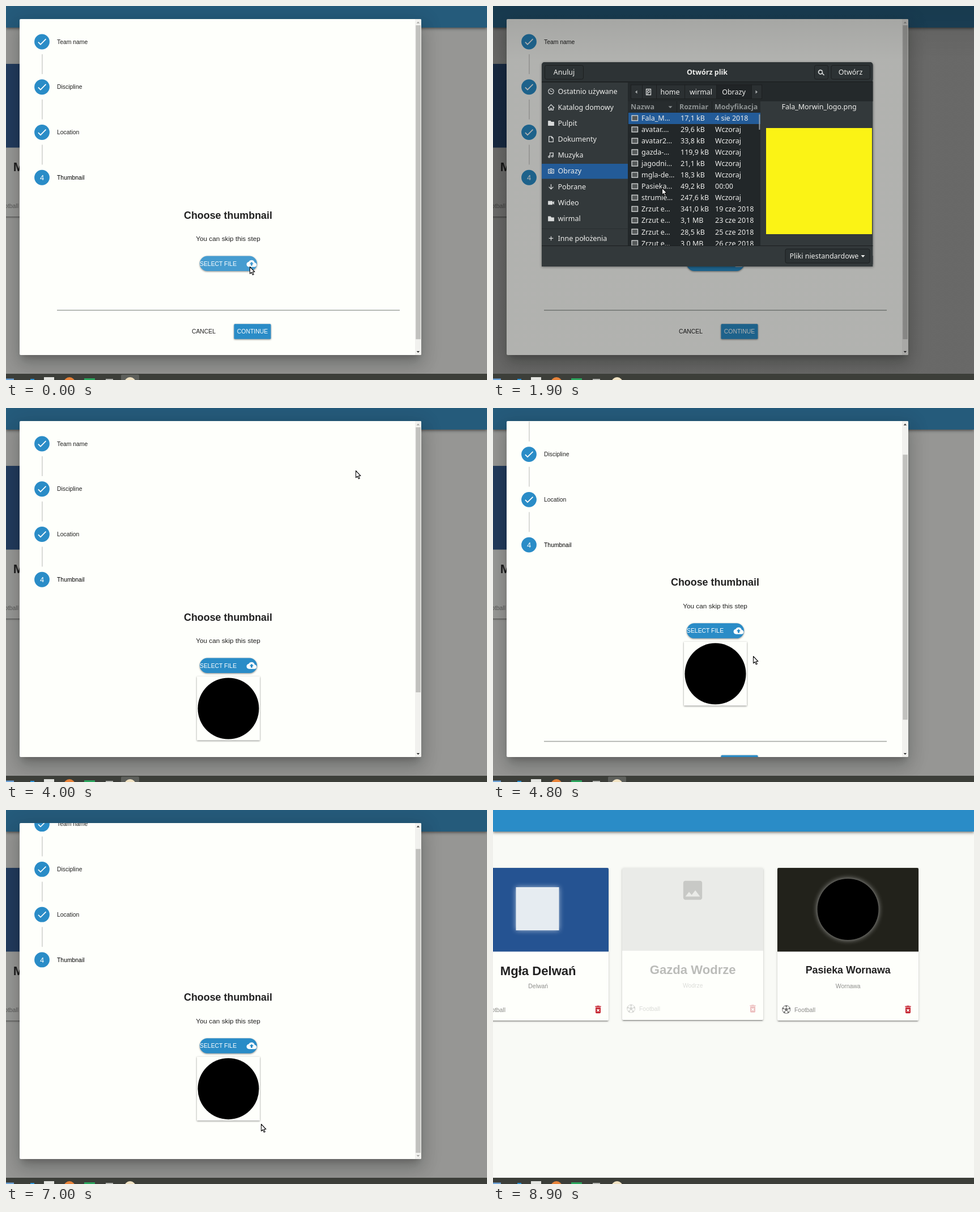
Write an HTML page that moves like this. It is 849 by 659 pixels and loops after 9.6 s.

```html
<!DOCTYPE html>
<html lang="en">
<head>
<meta charset="utf-8">
<title>Team wizard</title>
<style>
  html, body { margin: 0; width: 100%; height: 100%; overflow: hidden; background: #f9faf6; }
  #stage { position: relative; width: 849px; height: 659px; overflow: hidden; }
  #stage div { position: absolute; }
  svg { position: absolute; left: 0; top: 0; display: block; overflow: hidden; }
  text { font-family: "Liberation Sans", Arial, sans-serif; }
  .mid { text-anchor: middle; }
  .bold { font-weight: 700; }
  .card { background: #fefffb; border-radius: 2px; overflow: hidden;
    box-shadow: 0 3px 1px -2px #0003, 0 2px 2px #0003, 0 1px 5px #0002; }
  .raised { filter: drop-shadow(0 1px 1.5px #0007); }
  #bar { left: 0; top: 0; width: 849px; height: 37.5px; background: #2a8cc7;
    box-shadow: 0 2px 3px -1px #0004, 0 3px 4px #0003, 0 1px 8px #0003; }
  #overlay { inset: 0; background: #212121; }
  #modal { background: #fefffb; overflow: hidden; border-radius: 2px;
    box-shadow: 0 8px 11px -5px #0003, 0 18px 28px 2px #00000024, 0 7px 34px 6px #0000001f; }
  #dim { inset: 0 0 11px; background: linear-gradient(#0000005c, #0000004d 15%); }
  #chooser { border-radius: 5px 5px 0 0; box-shadow: 0 1px 4px #0006; }
  #chooser text { font-family: "Noto Sans", sans-serif; font-size: 12.5px; fill: #eeeeec; }
  #chooser .head { fill: #8d9293; }
  .icon { fill: none; stroke: #d8dada; stroke-width: 1.3; }
</style>
</head>
<body>
<div id="stage"></div>
<script>
const LOOP = 9600, STEP = 100, BLUE = '#2a8cc7', HOVER = '#469cd0', SELECTED = '#235b98';
const stage = document.getElementById('stage');

const text = (x, y, size, str, cls = '', fill = '#212121', extra = '') =>
  `<text x="${x}" y="${y}" font-size="${size}" class="${cls}" fill="${fill}" ${extra}>${str}</text>`;
const rect = (x, y, w, h, fill, extra = '') =>
  `<rect x="${x}" y="${y}" width="${w}" height="${h}" fill="${fill}" ${extra}/>`;
const circle = (x, y, r, fill, extra = '') =>
  `<circle cx="${x}" cy="${y}" r="${r}" fill="${fill}" ${extra}/>`;
const path = (d, fill, extra = '') => `<path d="${d}" fill="${fill}" ${extra}/>`;
const icon = (d, x, y, scale, fill) =>
  path(d, fill, `transform="translate(${x} ${y}) scale(${scale}) translate(-12 -12)"`);
const svg = (x, y, w, h, body, id = '') =>
  `<svg ${id && `id="${id}"`} width="${w}" height="${h}" viewBox="${x} ${y} ${w} ${h}">${body}</svg>`;
const panel = (id, cls, x, y, w, h, body) =>
  `<div id="${id}" class="${cls}" style="left:${x}px;top:${y}px;width:${w}px;height:${h}px">${body}</div>`;

const ICONS = {
  check: 'M9 16.17 4.83 12l-1.42 1.41L9 19 21 7l-1.41-1.41z',
  cloud: 'M19.35 10.04C18.67 6.59 15.64 4 12 4 9.11 4 6.6 5.64 5.35 8.04 2.34 8.36 0 10.91 0 14c0 3.31 2.69 6 6 6h13c2.76 0 5-2.24 5-5 0-2.64-2.05-4.78-4.65-4.96zM14 13v4h-4v-4H7l5-5 5 5z',
  trash: 'M6 19c0 1.1.9 2 2 2h8c1.1 0 2-.9 2-2V7H6zm2.46-7.12 1.41-1.41L12 12.59l2.12-2.12 1.41 1.41L13.41 14l2.12 2.12-1.41 1.41L12 15.41l-2.12 2.12-1.41-1.41L10.59 14zM15.5 4l-1-1h-5l-1 1H5v2h14V4z',
  image: 'M21 19V5c0-1.1-.9-2-2-2H5c-1.1 0-2 .9-2 2v14c0 1.1.9 2 2 2h14c1.1 0 2-.9 2-2zM8.5 13.5l2.5 3.01L14.5 12l4.5 6H5z'
};

// Team cards
function ball(x, y) {
  const at = (i, r) => {
    const a = (i * 72 - 90) * Math.PI / 180;
    return [x + r * Math.cos(a), y + r * Math.sin(a)].map(v => v.toFixed(1));
  };
  const five = [0, 1, 2, 3, 4];
  return circle(x, y, 7, 'none', 'stroke="#757575"') +
    path('M' + five.map(i => at(i, 3)).join('L') + 'z', '#757575') +
    path(five.map(i => `M${at(i, 3)}L${at(i, 7)}`).join(''), 'none', 'stroke="#757575"') +
    five.map(i => circle(...at(i, 6), 1.6, '#757575')).join('');
}

function card(id, x, height, picture, logo, name, size, baseline, place, opacity = 1) {
  const bottom = 102 + height, mid = x + 124.7;
  const body = rect(x, 102, 250, height - 121.5, picture) + logo +
    text(mid, baseline, size, name, 'mid bold') +
    text(mid, bottom - 57, 10.4, place, 'mid', '#8e8e8c') +
    ball(x + 15.7, bottom - 19.5) +
    text(x + 30, bottom - 15.5, 10.4, 'Football', '', '#8a8a88') +
    icon(ICONS.trash, x + 230.5, bottom - 19.5, .745, '#c62834');
  return panel(id, 'card', x, 102, 249, height, svg(x, 102, 249, height, `<g opacity="${opacity}">${body}</g>`));
}

const glow = 'style="filter:drop-shadow(0 0 5px #fff9)"';
const cards =
  card('card1', -45.5, 269, '#255392', rect(40, 136, 76, 76, '#e6ecf1', glow), 'Mgła Delwań', 22.1, 291, 'Delwań') +
  card('card2', 228, 267.5, '#bdbdbb', icon(ICONS.image, 352.5, 141.5, 1.85, '#4b4b4b'), 'Gazda Wodrze', 22.1, 289, 'Wodrze', .3) +
  card('card3', 501.5, 269, '#22221b', circle(626, 175, 54, '#000', glow), 'Pasieka Wornawa', 17.8, 287.5, 'Wornawa');

// Wizard
const stepY = i => 63 + i * 79.75;
const steps = ['Team name', 'Discipline', 'Location', 'Thumbnail'].map((label, i) =>
  circle(63.5, stepY(i), 13.4, BLUE, 'class="dot"') +
  (i < 3
    ? icon(ICONS.check, 63.5, stepY(i), .84, '#fff') + rect(63.3, stepY(i) + 22, 1.3, 35, '#c6c7c4')
    : text(63.5, stepY(i) + 4.6, 13, '4', 'mid', '#fff')) +
  text(90, stepY(i) + 3.7, 10.4, label, '', i < 3 ? '#212121' : '#000')).join('');

const wizard = steps +
  text(392, 374.5, 17.9, 'Choose thumbnail', 'mid bold') +
  text(392, 414.3, 11.8, 'You can skip this step', 'mid') +
  `<g class="raised">${rect(342, 440.5, 101, 26.5, BLUE, 'rx="13.25" id="select"')}</g>` +
  text(342, 457.5, 10.4, 'SELECT FILE', '', '#fff') +
  icon(ICONS.cloud, 433.5, 453.7, .745, '#fff') +
  `<g id="thumb">${rect(337, 473, 111, 112.5, '#fefffb', 'class="raised"')}${circle(392.5, 529.5, 54, '#000')}</g>
  <g id="footer">${rect(90, 535.3, 605, 1.6, '#a6aaa5')}
  ${text(349, 577.2, 10.4, 'CANCEL', 'mid')}
  ${rect(402.5, 560.3, 65, 26.5, BLUE, 'rx="1.5" class="raised" id="continue"')}
  ${text(435, 577.2, 10.4, 'CONTINUE', 'mid', '#fff')}</g>`;

const scrollbar = rect(722, 23, 11, 592, '#f1f1ee') +
  rect(723.3, 34, 8.5, 553, '#c1c1be', 'id="grip"') +
  path('M724.7 30.5h5.4l-2.7-3z', '#505050', 'id="up"') +
  path('M724.7 608h5.4l-2.7 3z', '#505050', 'id="down"');

const modal = panel('modal', '', 24, 23, 709, 592,
  svg(24, 23, 709, 760, `<clipPath id="clip">${rect(24, 23, 709, 700, '#000', 'id="clipBox"')}</clipPath>
    <g clip-path="url(#clip)">${wizard}</g>`, 'content') +
  svg(24, 23, 709, 592, scrollbar, 'scroll'));

// File chooser
const FOLDER = 'M-5-4h4l1 2h5v6H-5z';
const places = [
  ['Ostatnio używane', 'M0-5A5 5 0 1 1-.1-5zM-2-2 0 0h2.5'],
  ['Katalog domowy', 'M-6 1 0-5 6 1M-4 0v5h3V2h2v3h3V0'],
  ['Pulpit', FOLDER],
  ['Dokumenty', 'M-4-5h5l3 3v7h-8zM1-5v3h3'],
  ['Muzyka', 'M-2 3v-7h6v6M-2 3a1.5 1.5 0 1 1-.1-.5M4 2a1.5 1.5 0 1 1-.1-.5'],
  ['Obrazy', 'M-5-3h3l1-1h2l1 1h3v7H-5zM0-1.5A2 2 0 1 1-.1-1.5'],
  ['Pobrane', 'M0-5V4M-4 0 0 4 4 0'],
  ['Wideo', 'M-5-3h7v6h-7zM3 0l2-2v4z'],
  ['wirmal', FOLDER],
  ['Inne położenia', 'M-4 0h8M0-4v8']
].map(([label, d], i) => {
  const y = 150.5 + i * 28.05 + (i > 8 ? 6.5 : 0);
  const solid = [2, 7, 8].includes(i) ? 'style="fill:#d8dada"' : '';
  return path(d, 'none', `class="icon" ${solid} transform="translate(102.5 ${y}) scale(.95)"`) +
    text(114.5, y + 4.5, 12.5, label);
}).join('');

const rowY = i => 188 + i * 20.02;
const files = [
  ['Fala_M…', '17,1 kB', '4 sie 2018'], ['avatar.…', '29,6 kB', 'Wczoraj'],
  ['avatar2…', '33,8 kB', 'Wczoraj'], ['gazda-…', '119,9 kB', 'Wczoraj'],
  ['jagodni…', '21,1 kB', 'Wczoraj'], ['mgla-de…', '18,3 kB', 'Wczoraj'],
  ['Pasieka…', '49,2 kB', '00:00'], ['strumie…', '247,6 kB', 'Wczoraj'],
  ['Zrzut e…', '341,0 kB', '19 cze 2018'], ['Zrzut e…', '3,1 MB', '23 cze 2018'],
  ['Zrzut e…', '28,5 kB', '25 cze 2018'], ['Zrzut e…', '3,0 MB', '26 cze 2018']
].map(([name, size, date], i) => {
  const y = rowY(i);
  return rect(245, y + 5, 10.5, 9, '#55595a', 'stroke="#d8dada" stroke-width="1.3"') +
    text(262, y + 14.3, 12.5, name) + text(331, y + 14.3, 12.5, size) + text(392, y + 14.3, 12.5, date);
}).join('');

const button = (x, y, w, h) => rect(x, y, w, h, '#2c3234', 'rx="3" stroke="#1c1f20"');
const chooser = panel('chooser', '', 86, 99, 584.5, 360, svg(86, 99, 584.5, 360,
  rect(86, 99, 584.5, 360, '#33393b', 'rx="5"') + rect(86, 440, 584.5, 19, '#33393b') +
  rect(86, 99, 584.5, 35, '#2d3335', 'rx="5"') + rect(86, 133, 584.5, 1.5, '#191c1d') +
  button(91.5, 104.5, 68, 24.5) + button(567.5, 104.5, 24, 24.5) + button(597, 104.5, 68.5, 24.5) +
  text(125.5, 121, 12.5, 'Anuluj', 'mid') + text(378, 121, 12.5, 'Otwórz plik', 'mid bold') +
  text(631, 121, 12.5, 'Otwórz', 'mid') +
  path('M581.5 116a3.5 3.5 0 1 1-.1-.5M581 118.5l3.5 3.5', 'none', 'class="icon" style="stroke-width:1.7"') +
  rect(86, 278, 152, 26.5, SELECTED) + places + rect(86, 392, 152, 1, '#2a2f31') +
  rect(238, 134.5, 432.5, 33.5, '#24292b') +
  [[243, 20], [263, 25], [288, 50], [338, 56], [394, 62], [456, 18]].map(([x, w]) =>
    rect(x + .5, 139, w, 24.5, x === 394 ? '#202426' : '#2b3032', 'stroke="#1c1f20"')).join('') +
  path('M254.5 148.5v6l-3.5-3zM463.5 148.5v6l3.5-3z', '#a9adad') +
  path('M270.5 146.5h8v10h-8zM276.5 150.5a2 2 0 1 1-.1-.5M272 154.5h2', 'none', 'class="icon"') +
  text(312.5, 156, 12.5, 'home', 'mid') + text(367, 156, 12.5, 'wirmal', 'mid') + text(425, 156, 12.5, 'Obrazy', 'mid') +
  rect(238, 168, 234, 254, '#222729') + rect(238, 168, 234, 19.5, '#272c2e') +
  rect(324, 168, 1, 19, '#1d2122') + rect(386, 168, 1, 19, '#1d2122') +
  text(243, 182.3, 12.5, 'Nazwa', 'bold head') + text(329, 182.3, 12.5, 'Rozmiar', 'bold head') +
  text(391, 182.3, 12.5, 'Modyfikacja', 'bold head') + path('M309.5 176.5h7l-3.5 3.5z', '#8d9293') +
  `<clipPath id="listClip">${rect(238, 188, 234, 234, '#000')}</clipPath>
  <g clip-path="url(#listClip)">${rect(239, 188, 233, 20, SELECTED, 'id="row"')}${files}</g>` +
  rect(469.5, 191, 1.8, 27, '#a0a4a5', 'id="listGrip"') +
  text(575.5, 182, 12.5, '', 'mid', '#eeeeec', 'id="fileName"') +
  rect(482, 215, 187, 187, '#fbf315', 'id="logoA"') + circle(575.5, 308.5, 91, '#000', 'id="logoB"') +
  rect(86, 422, 584.5, 1, '#1c1f20') + button(516, 428, 149, 25) +
  text(523.5, 445, 12.5, 'Pliki niestandardowe') + path('M649.5 439h7l-3.5 4z', '#eeeeec')));

const taskbar = panel('taskbar', '', 0, 648, 849, 11, svg(0, 648, 849, 11,
  rect(0, 648, 849, 11, '#3c3e39') + rect(203, 649.5, 32, 10, '#5d5f5b', 'rx="2" id="active"') +
  rect(0, 656.5, 14, 8, '#6fa3d8') + rect(43, 657, 7, 7, '#2b93d6') + rect(67, 654, 18, 18, '#e4e5e1') +
  circle(112, 664, 10, '#e8833a') + rect(138, 656, 19, 10, '#2ba55d') + rect(176, 657, 13, 8, '#b5b6b2') +
  circle(219, 664, 10, '#f1e3c4')));

const cursor = `<svg id="cursor" width="24" height="24" viewBox="-6 -2 24 24">
  <g fill="#fff" stroke="#111" stroke-width="1.1" stroke-linejoin="round">
  <path id="arrow" d="M.5.5v12.3l2.8-2.6 2 4.6 2-.9-2-4.4h3.6z"/>
  <path id="hand" d="M-1 1Q0-.6 1 1v4l5.3 1q1.5.4 1.3 2L7 13H0l-3.7-4.6Q-3.4 6.8-1 8.5z"/></g></svg>`;

stage.innerHTML = cards + '<div id="bar"></div><div id="overlay"></div>' + modal +
  '<div id="dim"></div>' + taskbar + chooser + cursor;
const el = {};
stage.querySelectorAll('[id]').forEach(node => el[node.id] = node);
const dots = stage.querySelectorAll('.dot');

// Motion
const clamp = v => Math.max(0, Math.min(1, v));
const span = (t, from, to) => clamp((t - from) / (to - from));
const show = (node, on) => node.style.visibility = on ? 'visible' : 'hidden';
const set = (node, attrs) => { for (const k in attrs) node.setAttribute(k, attrs[k]); };

// Pointer stops: time, x, y
const route = [
  [0, 430, 459], [300, 432, 460], [900, 432, 460], [1600, 310, 326], [1900, 298, 320], [2500, 298, 320],
  [3300, 600, 125], [3500, 617, 110], [4000, 617, 110], [4400, 459, 437], [5000, 459, 437],
  [5500, 452, 540], [5900, 451, 552], [6900, 450, 553], [7700, 450, 553], [8600, 560, 180],
  [8800, 335, 12], [LOOP, 335, 12]
];
function pointer(t) {
  const i = route.findIndex(([time]) => time > t);
  const [t0, x0, y0] = route[i - 1], [t1, x1, y1] = route[i];
  const p = span(t, t0, t1), e = p * p * (3 - 2 * p);
  return [x0 + (x1 - x0) * e, y0 + (y1 - y0) * e];
}

function drawModal(t) {
  const loaded = t >= 3800, closing = span(t, 7000, 7215);
  const content = loaded ? 722.5 - 276.5 * span(t, 6900, 7200) : 610;
  const height = Math.min(592, content), room = Math.max(0, content - 592);
  const scroll = Math.min(room, 131 * span(t, 4520, 5120));
  const grip = 570 * 592 / Math.max(content, 592);
  el.overlay.style.opacity = .46 * (1 - closing);
  Object.assign(el.modal.style, {
    top: 319 - height / 2 + 'px', height: height + 'px',
    opacity: 1 - closing, transform: `scale(${1 - .51 * closing})`
  });
  el.content.style.transform = `translateY(${-scroll}px)`;
  set(el.clipBox, { height: content - 38 });
  set(el.grip, { y: 34 + (room ? scroll / room * (570 - grip) : 0), height: grip });
  set(el.up, { fill: scroll > 0 ? '#333' : '#a3a3a0' });
  set(el.down, { fill: scroll < room ? '#333' : '#a3a3a0' });
  show(el.scroll, room > 0);
  show(el.thumb, loaded);
  set(el.footer, { transform: `translate(0 ${loaded ? 112.5 : 0})` });
  set(el.select, { fill: t < 900 ? HOVER : BLUE });
  set(el.continue, { fill: t >= 5700 ? HOVER : BLUE });
  dots.forEach(dot => set(dot, { fill: closing ? '#8c9195' : BLUE }));
}

function drawChooser(t) {
  const picked = t >= 2100;
  const open = span(t, 800, 1050) * (1 - span(t, 3796, 3980));
  el.chooser.style.transform = `scaleY(${open})`;
  show(el.chooser, open > 0);
  el.dim.style.opacity = open;
  set(el.row, { y: rowY(picked ? 6 : 0) });
  el.fileName.textContent = picked ? 'Pasieka_Wornawa_herb.png' : 'Fala_Morwin_logo.png';
  show(el.logoA, open > 0 && !picked);
  show(el.logoB, open > 0 && picked);
  el.listGrip.style.opacity = t < 3600 ? 1 : .35;
}

function drawCursor(t) {
  const [x, y] = pointer(t);
  const hand = (t >= 100 && t < 900) || (t >= 5700 && t < 7000);
  el.cursor.style.transform = `translate(${x - 6}px, ${y - 2}px)`;
  show(el.arrow, !hand && t < 8900);
  show(el.hand, hand);
}

function draw(t) {
  drawModal(t);
  drawChooser(t);
  drawCursor(t);
  show(el.active, t < 900 || (t >= 4000 && t < 6500));
  el.card3.style.opacity = span(t, 7600, 8100);
}

const start = performance.now();
function tick() {
  const t = (performance.now() - start) % LOOP;
  draw(Math.floor(t / STEP) * STEP);
  requestAnimationFrame(tick);
}
tick();
</script>
</body>
</html>
```
